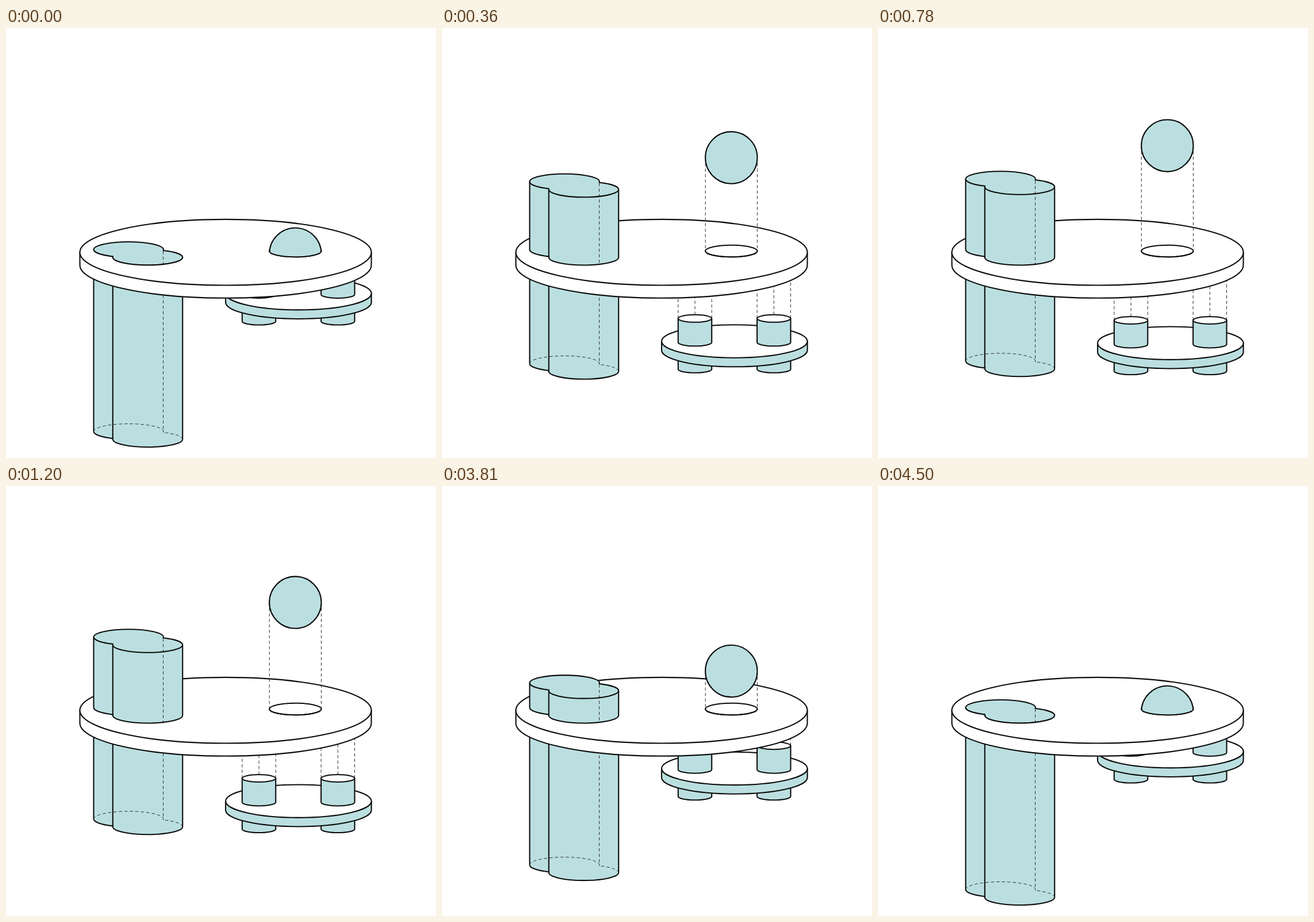
These frames come from a looping animation (748x748 px, 5400 ms). An HTML page:

```html
<!DOCTYPE html>
<html lang="en">
<head>
<meta charset="utf-8">
<title>Table assembly</title>
<style>
  html, body { margin: 0; width: 100%; height: 100%; overflow: hidden; background: #fff; }
  svg { display: block; width: 100vw; height: 100vh; }
  .line { fill: none; stroke: #0c0c0c; stroke-width: 2.1; stroke-linejoin: round; }
  .tint { fill: #bbdfe0; }
  .white { fill: #fff; }
  .dash { fill: none; stroke: #2b2b2b; stroke-width: 1; stroke-dasharray: 5.5 4; }
</style>
</head>
<body>
<svg viewBox="0 0 748 748">
  <defs>
    <clipPath id="under"><rect y="420" width="748" height="328"/></clipPath>
    <clipPath id="aboveSlot">
      <path d="M100 0H400V399H307.2A60.7 13.5 0 0 1 185.8 399V397.6A60.7 13.5 0 0 1 152.5 385.5H100Z"/>
    </clipPath>
    <clipPath id="aboveHole">
      <path d="M400 0H600V388H548.5A45.2 10.3 0 0 1 458.1 388H400Z"/>
    </clipPath>

    <g id="leg">
      <path class="line tint" d="M152.5 385.5A60.7 13.5 0 0 1 273.9 385.5L273.6 387A60.7 13.5 0 0 1 307.2 399
        V715.5A60.7 13.5 0 0 1 185.8 715.5V714.1A60.7 13.5 0 0 1 152.5 702Z"/>
      <path class="line" d="M307.2 399A60.7 13.5 0 0 1 185.8 399V397.6A60.7 13.5 0 0 1 152.5 385.5M185.8 398V715"/>
      <path class="dash" d="M273.5 388V703.5"/>
      <path class="dash" d="M152.5 702A60.7 13.5 0 0 1 273.9 702L273.6 703.5A60.7 13.5 0 0 1 307.2 715.5"/>
    </g>

    <path id="foot" class="line tint" d="M410.8 470V510.2A29.2 6.3 0 0 0 469.2 510.2V470Z"/>
    <g id="peg">
      <path class="dash" d="M410.8 422V330M440 415.5V330M469.2 422V330"/>
      <path class="line tint" d="M410.8 422V463.5A29.2 6.5 0 0 0 469.2 463.5V422Z"/>
      <ellipse class="line white" cx="440" cy="422" rx="29.2" ry="6.5"/>
    </g>
  </defs>

  <g clip-path="url(#under)">
    <g class="legs"><use href="#leg"/></g>
    <g id="shelf">
      <use href="#foot"/>
      <use href="#foot" x="137.3"/>
      <path class="line tint" d="M382 461.7V477.3A126.8 28.7 0 0 0 635.6 477.3V461.7Z"/>
      <ellipse class="line white" cx="508.8" cy="461.7" rx="126.8" ry="28.7"/>
      <use href="#peg"/>
      <use href="#peg" x="137.3"/>
    </g>
  </g>

  <path class="line white" d="M128.5 390V412.5A253.5 57.3 0 0 0 635.5 412.5V390Z"/>
  <ellipse class="line white" cx="382" cy="390.2" rx="253.5" ry="57.3"/>

  <g clip-path="url(#aboveSlot)">
    <g class="legs"><use href="#leg"/></g>
  </g>
  <path class="line" d="M307.2 399A60.7 13.5 0 0 1 185.8 399V397.6A60.7 13.5 0 0 1 152.5 385.5"/>

  <ellipse class="line white" cx="503.3" cy="388" rx="45.2" ry="10.3"/>
  <path id="guides" class="dash"/>
  <g clip-path="url(#aboveHole)">
    <circle id="ball" class="line tint" cx="503.3" cy="393" r="45.2"/>
  </g>
  <path class="line" d="M548.5 388A45.2 10.3 0 0 1 458.1 388"/>
</svg>

<script>
  const LOOP = 5400, STEP = 30, BACK = 3630, END = 4500;
  const $ = id => document.getElementById(id);
  const legs = document.querySelectorAll('.legs');

  const quintOut = t => 1 - Math.pow(1 - Math.min(t / 745, 1), 5);
  const expoOut = t => t <= 0 ? 0 : t >= 1200 ? 1 : 1 - Math.pow(2, -(t + 6) / 120);
  const fall = (left, span, power) => t => Math.pow((left - t) / span, power);

  // 0 = assembled, 1 = pulled apart
  const apart = (t, open, close) =>
    t < BACK ? open(t) : t < END ? close(t - BACK) : 0;

  const legBack = fall(1197, 1255, 5);
  const shelfBack = fall(1113, 1155, 5);
  const ballBack = fall(1157, 1250, 4);

  const shift = (el, y) => el.setAttribute('transform', `translate(0 ${y.toFixed(2)})`);

  function draw(t) {
    const legY = -122.7 * apart(t, quintOut, legBack);
    legs.forEach(el => shift(el, legY));
    shift($('shelf'), 86.5 * apart(t, quintOut, shelfBack));

    const cy = 393 - 190.4 * apart(t, expoOut, ballBack);
    $('ball').setAttribute('cy', cy.toFixed(2));
    const top = Math.min(cy, 388).toFixed(2);
    $('guides').setAttribute('d', `M458.2 ${top}V388M548.4 ${top}V388`);
  }

  let start;
  function tick(now) {
    start ??= now;
    const t = (now - start + 1) % LOOP;
    draw(Math.floor(t / STEP) * STEP);
    requestAnimationFrame(tick);
  }
  draw(0);
  requestAnimationFrame(tick);
</script>
</body>
</html>
```
